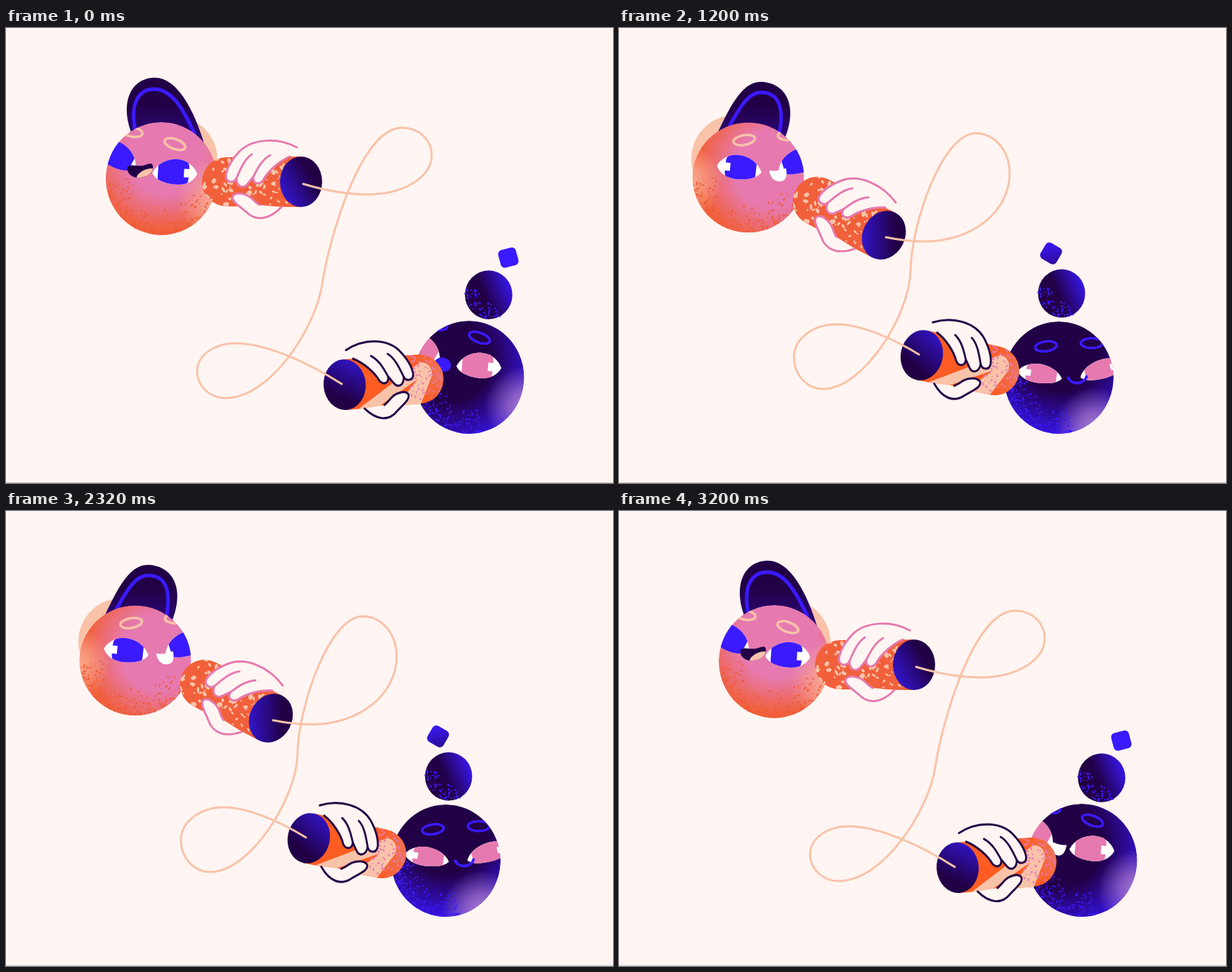
Recreate the animation shown at these times as an HTML page with a canvas. Size 864x648 px, loop 3.28 s.

```html
<!DOCTYPE html>
<html lang="en">
<head>
<meta charset="utf-8">
<title>Tin can call</title>
<style>
html, body { margin: 0; width: 100%; height: 100%; overflow: hidden; background: #fff5f2; }
canvas { display: block; }
</style>
</head>
<body>
<canvas id="stage" width="864" height="648"></canvas>
<script>
const ctx = document.getElementById('stage').getContext('2d');
const LOOP = 3280, STEP = 80, TAU = Math.PI * 2, RAD = Math.PI / 180;
const PAPER = '#fff5f2', INK = '#220046', BLUE = '#3a1aff', PINK = '#e67ab0',
      PEACH = '#f9c3a9', ORANGE = '#f1603a';

// Head: x y rx ry | face x y angle | mouth x y | lid, turn, ear sway
const pinkHead = {
  a: [221, 214.5, 79, 80.5, 199, 194, 16, -5, 11, 1, 0, 0],
  b: [222.5, 213.5, 79, 80.5, 201, 191, 16, -6, 10, 1, 0, 7],
  c: [219.5, 216, 79, 80, 203, 202, 14.5, -5, 12, .9, 0, 8],
  d: [184, 213, 79.5, 78.5, 214, 195, -6, 11, 15, .95, 1, 0],
  e: [183.5, 212, 77.5, 79.5, 221, 189, -8, 7, 14, 0, 1, 0],
  f: [184.5, 216.5, 83.5, 75.5, 208, 215, -2, 13, 4, .4, 1, 5]
};
// As above, with eye spacing | bun x y | cube x y angle
const darkHead = {
  a: [659, 497.5, 78.5, 80.5, 632, 469, 17, -5, 13, 1, 0, 42, 687, 380, 715, 327, 75],
  b: [661, 499.5, 79, 78.5, 634, 473, 17, -5, 13, 1, 0, 42, 692, 386, 726, 338, 78],
  c: [648, 508, 83, 77, 650, 518, 3, 0, 15, .85, .5, 50, 665, 401, 666, 337, 45],
  d: [626, 498, 78, 80, 643, 490, -4, 9, 12, .75, 1, 43, 630, 378, 615, 321, 30],
  e: [623, 494, 77.5, 80, 644, 474, -5, 9, 14, 1, 1, 44, 620, 373, 596, 317, 25],
  f: [656, 505, 83, 75, 632, 492, 14.5, -12, 11, .8, 0, 43, 661, 408, 667, 345, 60]
};
// Cup: x y angle | thread: low, side, top of its loop | middle of thread and its lean
const pinkCup = {
  a: [420, 219, 0, 515, 237, 606, 181, 564, 142, 450, 365, 10],
  c: [425, 229, 7, 510, 244, 589, 200, 543, 152, 442, 350, 6],
  d: [377, 295, 27, 435, 304, 556, 207, 508, 150, 415, 345, 1],
  e: [364, 256, 17.5, 425, 268, 547, 185, 508, 140, 405, 350, 8],
  f: [366, 277, 25.5, 445, 295, 556, 210, 512, 151, 422, 340, 1]
};
const darkCup = {
  a: [482, 508, -4.3, 313, 527, 272, 489, 326, 449],
  c: [394, 506, -3, 285, 521, 246, 489, 285, 444],
  d: [431, 466, 12, 291, 514, 249, 469, 310, 422],
  e: [434, 465, 13, 273, 512, 231, 465, 298, 415],
  f: [418, 555, -23, 299, 536, 264, 494, 290, 472]
};
pinkCup.b = pinkCup.a;
darkCup.b = darkCup.a;

const pinkPlan = [[0, 'a'], [560, 'b'], [880, 'c'], [1120, 'd'], [1200, 'd'], [1600, 'e'],
  [2000, 'e'], [2320, 'd'], [2560, 'f'], [2640, 'f'], [2960, 'a'], [LOOP, 'a']];
const darkPlan = [[0, 'a'], [560, 'b'], [640, 'b'], [760, 'f'], [880, 'c'], [1120, 'd'], [1200, 'd'],
  [1600, 'e'], [2000, 'e'], [2320, 'd'], [2440, 'c'], [2560, 'f'], [2800, 'a'], [LOOP, 'a']];

const mix = (a, b, k) => a + (b - a) * k;
const mixAll = (a, b, k) => a.map((v, i) => mix(v, b[i], k));

function pose(plan, poses, t) {
  const i = plan.findIndex((key, n) => n && t < key[0]);
  const [t0, p0] = plan[i - 1], [t1, p1] = plan[i];
  const k = (t - t0) / (t1 - t0);
  return mixAll(poses[p0], poses[p1], k * k * (3 - 2 * k));
}

let seed = 7;
const rnd = (lo = 0, hi = 1) => {
  seed = (seed * 16807) % 2147483647;
  return lo + (hi - lo) * seed / 2147483647;
};
// Unit-circle grain, denser toward the rim
const grain = (n, from, to, inner) => Array.from({ length: n }, () => {
  const a = rnd(from, to) * RAD, r = mix(inner, 1, Math.sqrt(rnd()));
  return [Math.cos(a) * r, Math.sin(a) * r, rnd(.7, 1.5)];
});
const pinkGrain = grain(190, 20, 180, .5);
const darkGrain = grain(230, 75, 190, .5);
const bunGrain = grain(75, 60, 200, .3);
const capGrain = Array.from({ length: 110 }, () => [rnd(-142, -92), rnd(-35, 30), rnd(.7, 1.5)]);
const chips = Array.from({ length: 95 }, () => [rnd(-140, -8), rnd(-33, 33), rnd(1.2, 4.6), rnd(0, TAU), rnd(.4, .8)]);

function group(x, y, angle, draw) {
  ctx.save();
  ctx.translate(x, y);
  ctx.rotate(angle * RAD);
  draw();
  ctx.restore();
}
function oval(x, y, rx, ry = rx, angle = 0) {
  ctx.beginPath();
  ctx.ellipse(x, y, rx, ry, angle, 0, TAU);
}
function fill(color, path) {
  ctx.fillStyle = color;
  path ? ctx.fill(path) : ctx.fill();
}
function line(color, width, path) {
  ctx.strokeStyle = color;
  ctx.lineWidth = width;
  path ? ctx.stroke(path) : ctx.stroke();
}
function stops(g, list) {
  list.forEach(([at, color]) => g.addColorStop(at, color));
  return g;
}
const radial = (x, y, r, ...list) => stops(ctx.createRadialGradient(x, y, 0, x, y, r), list);
const linear = (x0, y0, x1, y1, ...list) => stops(ctx.createLinearGradient(x0, y0, x1, y1), list);
function dots(list, rx, ry, color) {
  ctx.beginPath();
  for (const [x, y, r] of list) {
    ctx.moveTo(x * rx + r, y * ry);
    ctx.arc(x * rx, y * ry, r, 0, TAU);
  }
  fill(color);
}
function glow(x, y, r, rgb, alpha) {
  fill(radial(x, y, r, [0, `rgba(${rgb},${alpha})`], [.4, `rgba(${rgb},${alpha * .7})`], [1, `rgba(${rgb},0)`]));
}

const eyeShape = new Path2D('M-31 3C-24-13-8-19 4-19C19-19 29-9 33 0C28 12 15 18 0 17C-15 16-26 12-31 3Z');
const smileShape = new Path2D('M-13-4C-9 7 9 7 13-4');
const teethShape = new Path2D('M-12-7Q0-4 12-8Q14 10 2 10Q-11 9-12-7Z');
const openShape = new Path2D('M-18-6C-12-10-5-6 2-7C10-8 18-14 18-5C17 5 8 10-4 10C-15 9-20 1-18-6Z');

function eye(side, sep, lid, iris) {
  ctx.save();
  ctx.scale(side, 1);
  ctx.translate(sep, 0);
  ctx.rotate(-12 * RAD);
  if (lid < .12) {
    ctx.beginPath();
    ctx.moveTo(-26, 11);
    ctx.quadraticCurveTo(-4, -16, 26, 1);
    line(PEACH, 3.5);
  } else {
    ctx.scale(1, lid);
    fill('#fff', eyeShape);
    ctx.clip(eyeShape);
    ctx.beginPath();
    ctx.roundRect(-23, -22, 44, 44, 14);
    fill(iris);
    ctx.fillStyle = '#fff';
    ctx.fillRect(14, -6, 11, 12);
  }
  ctx.restore();
}

function face(p, sep, iris, browColor, mouth) {
  const [x, y, , , fx, fy, angle, mx, my, lid] = p;
  group(fx - x, fy - y, angle, () => {
    for (const side of [-1, 1]) {
      eye(side, sep, lid, iris);
      oval(side * sep * .76, -39, 15.5, 7, side * 4 * RAD);
      line(browColor, 3.5);
    }
    group(mx, my, 0, () => mouth(angle));
  });
}

function openMouth(angle) {
  ctx.rotate(-angle * RAD);
  fill(INK, openShape);
  ctx.clip(openShape);
  oval(10, 7, 16, 9, -.35);
  fill(PEACH);
}
function sideMouth(angle) {
  ctx.rotate(-angle * RAD);
  ctx.beginPath();
  ctx.roundRect(-10, -5, 20, 11, 4);
  ctx.clip();
  fill(INK);
  oval(7, 5, 10, 7);
  fill(PEACH);
  ctx.fillStyle = '#fff';
  ctx.fillRect(-10, -5, 20, 5);
}

// Start point, then two cubic segments, in the left-turned and right-turned pose
const earPoses = [
  [-42, -62, -60, -108, -42, -141, -9, -141, 22, -141, 46, -98, 62, -46],
  [-47, -56, -28, -97, -10, -137, 17, -137, 50, -137, 72, -107, 52, -56]
];
const rimPoses = [
  [-36, -62, -46, -106, -32, -125, -10, -125, 16, -125, 32, -95, 47, -64],
  [-34, -60, -12, -102, 0, -122, 18, -122, 46, -122, 51, -95, 43, -58]
];
function earPath([from, to], turn, sway) {
  const p = mixAll(from, to, turn).map((v, i, all) => i % 2 ? v : v + sway * Math.max(0, (-all[i + 1] - 60) / 80));
  ctx.beginPath();
  ctx.moveTo(p[0], p[1]);
  ctx.bezierCurveTo(...p.slice(2, 8));
  ctx.bezierCurveTo(...p.slice(8));
}

function drawPink(p, t) {
  const [x, y, rx, ry, , , , , , , turn, sway] = p;
  group(x, y, 0, () => {
    oval(mix(18, -19, turn), -27, 62);
    fill(PEACH);
    ctx.save();
    ctx.scale(rx / 79, ry / 79);
    earPath(earPoses, turn, sway);
    fill(linear(0, -140, 0, -50, [0, INK], [.4, INK], [1, '#2c0a7e']));
    earPath(rimPoses, turn, sway);
    line(BLUE, 5);
    ctx.restore();

    oval(0, 0, rx, ry);
    ctx.clip();
    fill(radial(mix(5, 35, turn), mix(-32, -12, turn), 122, [0, PINK], [.45, PINK], [.88, ORANGE], [1, ORANGE]));
    glow(88, 32, 65, '252,184,160', .95 * (1 - turn));
    glow(-88, 5, 52, '252,184,160', .9 * turn);
    dots(pinkGrain, rx, ry, '#ee5a35');
    const kind = t < 1040 || t > 2640 ? 1 : Math.floor((t - 1200) / 240) & 3;
    const mouth = kind == 0 ? () => fill('#fff', teethShape) : kind == 3 ? sideMouth : openMouth;
    face(p, 42, BLUE, PEACH, mouth);
  });
}

function drawDark(p, t) {
  const [x, y, rx, ry, , , , , , , turn, sep, bx, by, cx, cy, angle] = p;
  group(x, y, 0, () => {
    oval(0, 0, rx, ry);
    ctx.clip();
    fill(radial(mix(-30, 0, turn), mix(-25, -42, turn), 132, [0, INK], [.46, INK], [.92, '#3513e0'], [1, '#3513e0']));
    glow(mix(80, 52, turn), mix(42, 72, turn), 58, '192,142,200', .85);
    dots(darkGrain, rx, ry, '#3a1af0');
    face(p, sep, PINK, BLUE, () => {
      const beat = Math.floor(t / 160);
      if (t > 720 && t < 2480) line(BLUE, 4, smileShape);
      else if (t >= 2480 && beat % 2 == 0) fill('#fff', teethShape);
      else {
        oval(-2, 0, beat % 2 ? 8 : 12, beat % 2 ? 7 : 10);
        fill(BLUE);
      }
    });
  });
  group(bx, by, 0, () => {
    const w = 34 * rx / 79, h = 34.5 * ry / 80;
    oval(0, 0, w, h);
    fill(linear(-24, 12, 32, -12, [0, INK], [.35, INK], [1, '#3716e8']));
    dots(bunGrain, w, h, BLUE);
  });
  const sway = t < 560 ? 12 * Math.sin(Math.PI * t / 560) : 0;
  group(cx + sway, cy, angle, () => {
    const shade = Math.max(0, Math.min(1, (75 - angle) / 20));
    ctx.beginPath();
    ctx.roundRect(-13, -13, 26, 26, 6);
    fill(BLUE);
    ctx.globalAlpha = shade * .6;
    fill(linear(-13, -13, 13, 13, [0, BLUE], [1, INK]));
  });
}

const palm = 'M-6-49C-35-64-70-61-88-43C-98-32-106-19-107-8C-107 1-96 3-92-5C-92 7-82 11-76 3L-68-7C-69 3-60 5-54-2C-48-14-32-29-16-36';
const hand = new Path2D(palm);
const gaps = new Path2D('M-70-39C-80-33-86-19-92-5M-44-38C-56-31-62-19-68-7');
const thumb = new Path2D('M-28 36C-45 54-64 57-78 43C-90 33-100 27-97 20C-92 14-78 17-70 24C-66 28-63 31-59 33');
const zigzag = new Path2D('M-14 38L-110-24Q-126-22-125-4L-106 36H-72L-104 0L-44 36Z');

function drawCup([x, y, angle], dark) {
  group(x, y, angle, () => {
    if (dark) ctx.scale(-1, 1);
    ctx.save();
    ctx.beginPath();
    ctx.moveTo(0, -36);
    ctx.lineTo(-106, -35);
    ctx.arc(-106, 0, 35, -Math.PI / 2, Math.PI / 2, true);
    ctx.lineTo(0, 36);
    fill(dark ? '#fd5c22' : ORANGE);
    ctx.clip();
    if (dark) {
      fill(radial(-142, -8, 50, [0, 'rgba(232,123,110,.8)'], [1, 'rgba(232,123,110,0)']));
      fill(PEACH, zigzag);
      dots(capGrain, 1, 1, PINK);
    } else {
      for (const [u, v, r, a, flat] of chips) {
        oval(u, v, r, r * flat, a);
        fill(PEACH);
      }
    }
    ctx.restore();
    oval(0, 0, 30, 36);
    fill(dark ? linear(-18, -30, 8, 16, [0, '#3013c0'], [1, INK])
              : linear(-28, 14, 14, -8, [0, '#3215cc'], [1, INK]));
    if (dark) ctx.scale(.92, 1);
    const ink = dark ? INK : PINK;
    for (const shape of [hand, thumb]) {
      fill(PAPER, shape);
      line(ink, 3, shape);
    }
    line(ink, 3, gaps);
  });
}

// Quarter arc; leaves horizontally if flat, otherwise vertically
function quarter(x0, y0, x1, y1, flat) {
  const k = .56;
  if (flat) ctx.bezierCurveTo(mix(x0, x1, k), y0, x1, mix(y1, y0, k), x1, y1);
  else ctx.bezierCurveTo(x0, mix(y0, y1, k), mix(x1, x0, k), y1, x1, y1);
}

function drawThread(p, d) {
  const [px, py, , lowX, lowY, sideX, sideY, topX, topY, midX, midY, lean] = p;
  const [dx, dy, , low2X, low2Y, side2X, side2Y, top2X, top2Y] = d;
  const x0 = px + 3, y0 = py + 3, x1 = dx - 4, y1 = dy - 1;
  ctx.beginPath();
  ctx.moveTo(x0, y0);
  ctx.bezierCurveTo(mix(x0, lowX, .35), mix(y0, lowY, .65), mix(lowX, x0, .35), lowY, lowX, lowY);
  quarter(lowX, lowY, sideX, sideY, true);
  quarter(sideX, sideY, topX, topY, false);
  ctx.bezierCurveTo(mix(topX, midX, .52), topY, midX + lean, midY - 65, midX, midY);
  ctx.bezierCurveTo(midX - lean, midY + 65, mix(low2X, midX, .45), low2Y, low2X, low2Y);
  quarter(low2X, low2Y, side2X, side2Y, true);
  quarter(side2X, side2Y, top2X, top2Y, false);
  ctx.bezierCurveTo(mix(top2X, x1, .3), top2Y, mix(top2X, x1, .7), mix(top2Y, y1, .5), x1, y1);
  line(PEACH, 3);
}

function frame(now) {
  const t = Math.floor((now % LOOP) / STEP) * STEP;
  const pinkHold = pose(pinkPlan, pinkCup, t), darkHold = pose(darkPlan, darkCup, t);
  ctx.lineCap = ctx.lineJoin = 'round';
  ctx.fillStyle = PAPER;
  ctx.fillRect(0, 0, 864, 648);
  ctx.fillStyle = '#c8c3c4';
  ctx.fillRect(0, 647, 864, 1);
  drawPink(pose(pinkPlan, pinkHead, t), t);
  drawDark(pose(darkPlan, darkHead, t), t);
  drawCup(pinkHold, false);
  drawCup(darkHold, true);
  drawThread(pinkHold, darkHold);
}

const start = performance.now();
function tick() {
  frame(performance.now() - start);
  requestAnimationFrame(tick);
}
tick();
</script>
</body>
</html>
```
